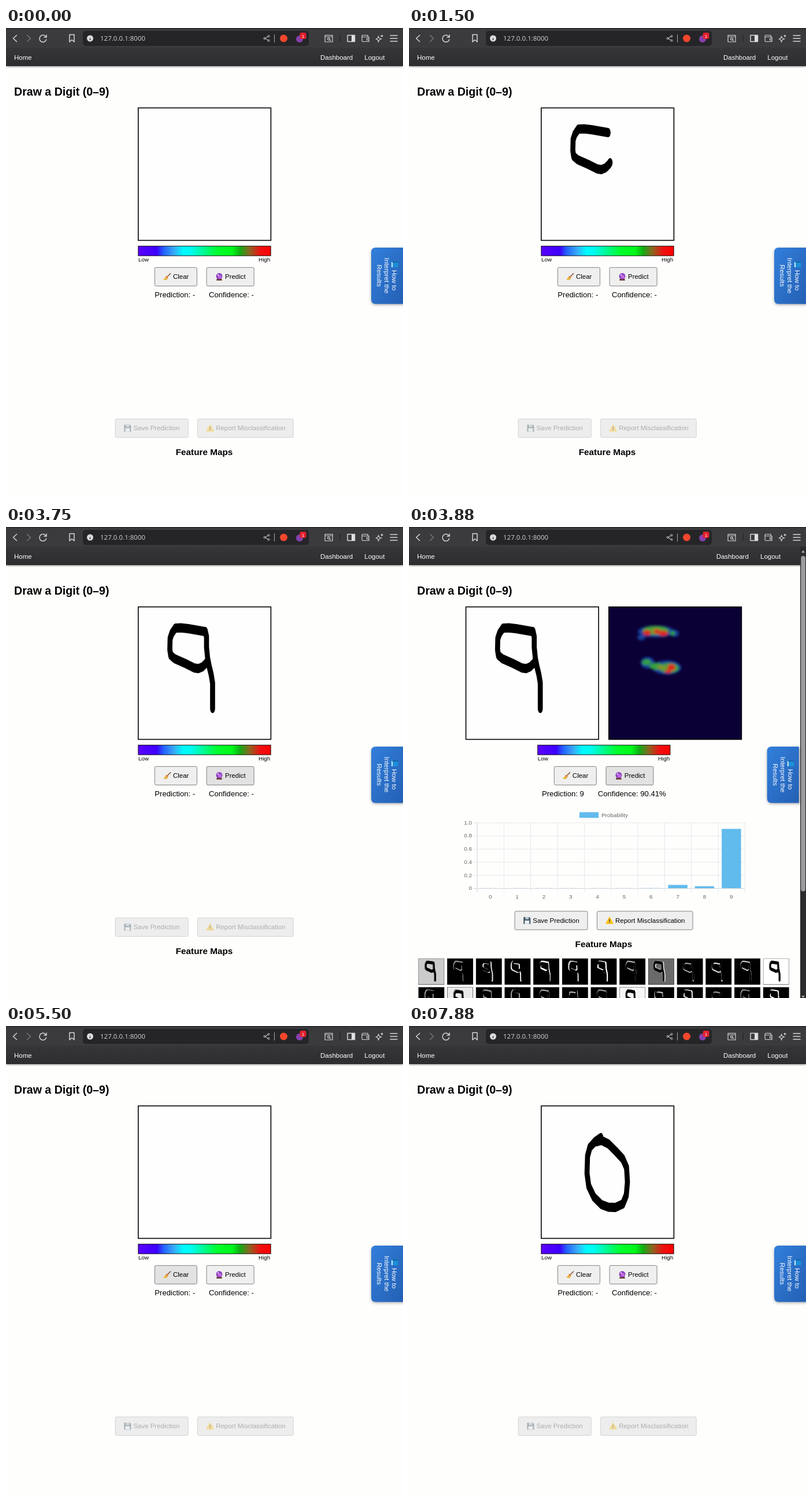
An HTML page that plays this animation: 687x815 px, repeating every 8000 ms.

```html
<!DOCTYPE html>
<html lang="en">
<head>
<meta charset="utf-8">
<title>Draw a Digit</title>
<style>
  html, body { margin: 0; width: 100%; height: 100%; overflow: hidden; background: #fefefd; }
  svg { display: block; width: 100vw; height: 100vh; }
  text { font-family: "Liberation Sans", Arial, sans-serif; font-size: 11.48px; }
  .icon { fill: none; stroke: #d6d6d8; stroke-width: 1.5; stroke-linecap: round; stroke-linejoin: round; }
  .pen { fill: none; stroke: currentColor; stroke-linecap: round; stroke-linejoin: round; }
</style>
</head>
<body>
<svg id="stage" viewBox="0 0 687 815"></svg>
<script>
const LOOP = 8000, TICK = 125;
const PEN_ASPECT = 0.54; // the pen tip is narrower than it is tall

const LOOP_OF_NINE = '344.5,181 316,176 303,174.5 293,175 287,184 284,193 283.5,212 285,222 292,228 310,236 326,244 333,245 340,242 346,236 348,233';
const LEG_OF_NINE = '345,181 347,190 347,208 349,228 352,243 355,255 357.5,270 357.5,314';
const ZERO = '332,193 322,200 313,210 309,225 308,255 311,277 320,296 333,309 345,313.5 357,314 370,308 376,293 378,270 376.5,245 370,230 358,217 345,204 333,198 321,201';

const rect = (x, y, w, h, fill, extra = '') =>
  `<rect x="${x}" y="${y}" width="${w}" height="${h}" fill="${fill}" ${extra}/>`;
const label = (x, y, str, fill = '#000', extra = '') =>
  `<text x="${x}" y="${y}" fill="${fill}" ${extra}>${str}</text>`;
const size = px => `style="font-size:${px}px"`;
const at = (x, y, content, extra = '') => `<g transform="translate(${x} ${y})" ${extra}>${content}</g>`;
const repeat = (n, fn) => Array.from({ length: n }, (_, i) => fn(i)).join('');

function stroke(points, progress = 1) {
  if (progress <= 0) return '';
  const wide = points.replace(/([\d.]+),/g, (_, x) => (x / PEN_ASPECT).toFixed(1) + ',');
  return `<polyline class="pen" points="${wide}" transform="scale(${PEN_ASPECT} 1)" pathLength="1"
    stroke-dasharray="${progress >= 1 ? 'none' : progress + ' 2'}"/>`;
}

// Small pictograms, centred on the origin
const emoji = {
  broom: `<path d="M6-6L0 0" stroke="#8a5a3c" stroke-width="1.5"/><path d="M-1-2L2 1L-1 6L-7 5Z" fill="#f2c14e"/>
    <path d="M-2-1L1 2" stroke="#d9534f" stroke-width="1.3"/><path d="M-5 4L-1 1M-2 5L0 2" stroke="#c08a2c" stroke-width=".7"/>`,
  ball: `<path d="M-4 3H4L5 6.5H-5Z" fill="#6b4038"/><circle cy="-1" r="5.4" fill="#8b3fc0"/>
    <circle cx="1" cy="0" r="3" fill="#c06be0"/><circle cx="-2" cy="-3" r="1.3" fill="#e9c8f7"/>`,
  disk: `<path d="M-6-6H4L6-4V6H-6Z" fill="#3f5561"/>` + rect(-3, -6, 6, 4, '#b8c8d0') + rect(-4, 0, 8, 6, '#e8eef1'),
  warning: `<path d="M0-5.5L6 5H-6Z" fill="#fcc21b" stroke="#fcc21b" stroke-width="1.5" stroke-linejoin="round"/>
    <path d="M0-2V1.4M0 3.3V3.5" stroke="#444" stroke-width="1.5" stroke-linecap="round"/>`,
  book: rect(-5, -6, 10, 12, '#1c8fd6', 'rx="1"') + rect(-4, 3.5, 9, 1.7, '#e8f3fa') + rect(-5, -6, 2, 10, '#1565a8')
};

const defs = `<defs>
  <linearGradient id="scale">
    <stop offset="0" stop-color="#5a00ff"/><stop offset=".14" stop-color="#3c00ff"/>
    <stop offset=".19" stop-color="#2460ff"/><stop offset=".27" stop-color="#38aaf8"/>
    <stop offset=".34" stop-color="#00fbff"/><stop offset=".4" stop-color="#00fcf0"/>
    <stop offset=".52" stop-color="#00fa78"/><stop offset=".6" stop-color="#00ff2c"/>
    <stop offset=".71" stop-color="#00f818"/><stop offset=".77" stop-color="#14aa14"/>
    <stop offset=".84" stop-color="#8c6420"/><stop offset=".92" stop-color="#ee1010"/>
    <stop offset="1" stop-color="#f00"/>
  </linearGradient>
  <linearGradient id="tab" x2="1" y2="1"><stop stop-color="#327fdb"/><stop offset="1" stop-color="#2460b4"/></linearGradient>
  <linearGradient id="nav" x2="0" y2="1"><stop stop-color="#363638"/><stop offset="1" stop-color="#2d2d2f"/></linearGradient>
  <filter id="shadow" x="-20%" y="-20%" width="140%" height="140%"><feGaussianBlur stdDeviation="2.5"/></filter>
  <filter id="glow" x="-50%" y="-50%" width="200%" height="200%"><feGaussianBlur stdDeviation="2.2"/></filter>
  <filter id="soft"><feGaussianBlur stdDeviation="2.5"/></filter>
  <clipPath id="thumb"><rect width="45" height="45.5"/></clipPath>
  <g id="nine">${stroke(LOOP_OF_NINE)}${stroke(LEG_OF_NINE)}</g>
</defs>`;

const icon = (x, d, extra = '') => at(x, 18, `<path class="icon" d="${d}" ${extra}/>`);
const browserBar = rect(0, 0, 687, 34, '#3b3b3e') + rect(0, 0, 687, 1.5, '#29292d')
  + rect(133, 5, 391, 26, '#252528', 'rx="5"')
  + icon(15.5, 'M3-5.5L-3 0L3 5.5')
  + icon(39.5, 'M-3-5.5L3 0L-3 5.5', 'style="stroke:#77777a"')
  + icon(64, 'M5.5-2A6 6 0 1 0 5.7 2M6-6V-2H2')
  + icon(114, 'M-4-6.5H4V6L0 2.5L-4 6Z')
  + at(145.5, 18, `<circle r="5.5" fill="#dcdcde"/><path d="M0-2.8V-2.6M0-.3V3" stroke="#252528" stroke-width="1.5"/>`)
  + label(163, 22, '127.0.0.1:8000', '#c9c9cb', `style="font:11.5px 'Noto Sans',sans-serif"`)
  + icon(451, 'M-3 0L3-3.5M-3 0L3 3.5', 'style="stroke-width:1"')
  + repeat(3, i => `<circle cx="${[447.5, 454.5, 454.5][i]}" cy="${[18, 14.2, 21.8][i]}" r="1.6" fill="none" stroke="#bbb"/>`)
  + rect(464, 11, 1, 14, '#aaa')
  + `<circle cx="480.5" cy="18" r="6.5" fill="#f4472c"/><circle cx="508" cy="19" r="6" fill="#8440ae"/>`
  + rect(508.5, 8, 11, 11, '#e3202e', 'rx="3"')
  + label(514, 16.5, '1', '#fff', 'text-anchor="middle" style="font-size:8px"')
  + icon(558.5, 'M-6.5-5.5H6.5V6H-6.5ZM-6.5-3H6.5M1.8 1A1.9 1.9 0 1 0-2 1A1.9 1.9 0 1 0 1.8 1M1.5 2.4L3 4', 'style="stroke-width:1.2"')
  + rect(577.5, 12, 1, 12, '#1f1f22')
  + icon(597, 'M-6-5.5H6.5V5.5H-6Z') + rect(598, 13, 5, 10, '#e0e0e2')
  + icon(622, 'M4-3V-5.5H-4Q-6-5.5-6-3.5V4Q-6 5.5-4.5 5.5H6V-2.5H-5M6 0H2.5V3H6', 'style="stroke-width:1.2"')
  + icon(646, 'M-1.5-4Q-1 .5 4 1Q-1 1.5-1.5 6.5Q-2 1.5-6 1Q-2 .5-1.5-4ZM4.5-6V-2.5M2.8-4.3H6.2', 'style="stroke-width:1.2"')
  + icon(671, 'M-6-5H6M-6 0H6M-6 5H6');

function button(x, y, w, name, textX, str, mode) {
  const fill = { idle: '#efefef', hover: '#e2e2e2', active: '#f3f3f3', disabled: '#ededed' }[mode];
  const off = mode === 'disabled';
  return rect(x, y, w, 32, fill, `rx="2" stroke="${off ? '#cfcfcf' : '#767676'}" stroke-width=".9"`)
    + at(textX - 10, y + 16, emoji[name], off ? 'opacity=".4"' : '')
    + label(textX, y + 20, str, off ? '#adadad' : '#000');
}

const turned = (x, y, str) => `<text transform="translate(${x} ${y}) rotate(90)" text-anchor="middle" fill="#fff">${str}</text>`;
const sideTab = '<path d="M690 382H640Q632 382 632 390V471Q632 479 640 479H690Z" fill="#0005" filter="url(#shadow)"/>'
  + '<path d="M687 380H640Q632 380 632 388V469.500Q632 477.500 640 477.500H687Z" fill="url(#tab)"/>'
  + at(672.5, 409, `<g transform="rotate(90)">${emoji.book}</g>`)
  + turned(668, 436.5, 'How to') + turned(655, 428.5, 'Interpret the') + turned(642, 428.5, 'Results');

function chart() {
  const left = 117.5, step = 46.35, top = 511.5, bottom = 625, grid = '#e3e6e8';
  const probability = [.001, .001, .001, .001, .001, .001, .002, .05, .03, .9041];
  const text = (x, y, str, anchor) => label(x, y, str, '#666', `text-anchor="${anchor}" ${size(9.84)}`);
  return rect(295, 493.5, 33, 9.8, '#61bbed') + text(333, 501.5, 'Probability', 'start')
    + repeat(6, i => {
      const y = top + i * (bottom - top) / 5;
      return rect(111, y, 470, .9, i === 5 ? '#ccd2d5' : grid)
        + text(109, y + 3.2, ['1.0', '0.8', '0.6', '0.4', '0.2', '0'][i], 'end');
    })
    + repeat(11, i => rect(left + i * step, top, .9, 120.5, i ? grid : '#ccd2d5'))
    + repeat(10, i => {
      const h = probability[i] * (bottom - top), x = left + (i + .5) * step;
      return rect(x - 16.7, bottom - h, 33.4, h, '#61bbed') + text(x, 643, i, 'middle');
    });
}

const blobs = (fill, list) => list.map(([x, y, rx, ry]) =>
  `<ellipse cx="${x}" cy="${y}" rx="${rx}" ry="${ry}" fill="${fill}"/>`).join('');
const heatmap = rect(345.8, 138.3, 229.6, 229.2, '#0b0036', 'stroke="#000" stroke-width="1.6"')
  + '<g filter="url(#glow)">'
  + blobs('#17409c', [[428, 181, 32, 10], [402, 191, 7, 5], [460, 184, 7, 6], [413, 235, 12, 10], [446, 243, 25, 12]])
  + blobs('#35a03c', [[427, 179, 23, 8], [456, 184, 4, 4], [411, 234, 8, 5], [428, 241, 12, 6], [450, 244, 17, 9]])
  + blobs('#82972c', [[428, 180, 9, 6], [437, 243, 8, 4]])
  + blobs('#da2b20', [[412, 183, 7, 5], [440, 184, 8, 5], [429, 181, 5, 4], [454, 243, 7, 6], [448, 250, 6, 3]])
  + '</g>';

// Each feature map: background, digit colour, and an offset that leaves only edges
const nineIn = (color, dx, dy, width) => `<use href="#nine" stroke-width="${width}" style="color:${color}"
  transform="translate(${-50.4 + dx} ${-31.7 + dy}) scale(.22)" filter="url(#soft)"/>`;
function featureMap([bg, color, dx, dy], x, y) {
  const cover = bg === '#000' ? '#000' : '#050505';
  return at(x, y, rect(0, 0, 45, 45.5, bg)
    + nineIn(color, 0, 0, 25) + nineIn(cover, dx, dy, 23)
    + rect(.3, .3, 44.4, 44.9, 'none', 'stroke="#222" stroke-width=".6"'), 'clip-path="url(#thumb)"');
}
const dark = (color, dx, dy) => ['#000', color, dx, dy];
const firstRow = [['#cbcbcb', '#555', 1, 0], dark('#999', 1, 2), dark('#eee', -1.8, -.8), dark('#eee', 1.8, -1),
  dark('#fff', -1, 2.2), dark('#ddd', 2, 1.5), dark('#fff', -2, .8), dark('#aaa', .2, 2.2), ['#6a6a6a', '#e8e8e8', -1.5, 0],
  dark('#aaa', 0, -1.8), dark('#ddd', .2, -2), dark('#ccc', 0, 2), ['#fff', '#333', .5, 0]];
const secondRow = [dark('#aaa', 1.5, 1), ['#eaeaea', '#666', 1, 1], dark('#999', -1, 2), dark('#999', 2, 0), dark('#aaa', 0, 2),
  dark('#bbb', -1, -2), dark('#999', 0, 2), ['#f6f6f6', '#333', 0, 0], dark('#bbb', 1, -2), dark('#ddd', -2, 1),
  dark('#999', 0, -2), dark('#aaa', 1, 1.5), dark('#fff', -1.5, 1.5)];
const row = (maps, y) => maps.map((map, i) => featureMap(map, 16.3 + i * 49.7, y)).join('');
const results = heatmap + chart() + row(firstRow, 746.5) + row(secondRow, 796.3);

const scrollbar = rect(677, 34, 10, 781, '#2b2b2d') + rect(678.3, 50, 7.6, 580.500, '#9c9c9e', 'rx="3.8"')
  + '<path d="M679 44.500H685L682 40ZM679 811H685L682 815Z" fill="#a5a5a7"/>';

function scene(tick) {
  const done = tick >= 31 && tick < 44;
  const shift = done ? -6.15 : 0, lift = done ? -11.500 : 0;
  const progress = (first, steps) => Math.min(1, (tick - first + 1) / steps);
  const drawing = tick < 44
    ? stroke(LOOP_OF_NINE, progress(5, 8)) + stroke(LEG_OF_NINE, progress(19, 4))
    : stroke(ZERO, progress(55, 7));
  const predictMode = tick === 29 ? 'active' : tick >= 25 && tick < 35 ? 'hover' : 'idle';
  const clearMode = tick === 43 ? 'active' : tick >= 39 && tick < 46 ? 'hover' : 'idle';
  const saveMode = done ? 'idle' : 'disabled';
  const small = size(9.84), body = size(13.12);

  return defs + rect(0, 0, 687, 815, '#fefefd')
    + rect(0, 60, 687, 7, '#0006', 'filter="url(#shadow)"') + rect(0, 34, 687, 32, 'url(#nav)') + browserBar
    + label(14, 54.5, 'Home', '#fff')
    + at(2 * shift, 0, label(544, 54.5, 'Dashboard', '#fff') + label(620.3, 54.5, 'Logout', '#fff'))
    + label(14, 116.5, 'Draw a Digit (0–9)', '#000', 'font-weight="bold" style="font-size:19.6px"')
    + (done ? results : '')
    + at(done ? -130.3 : 0, 0,
      rect(228.8, 138.3, 229.6, 229.2, '#fefefe', 'stroke="#000" stroke-width="1.6"') + `<g stroke-width="16">${drawing}</g>`)
    + at(shift, 0,
      rect(228.9, 377.3, 229.2, 16.8, 'url(#scale)', 'stroke="#000" stroke-width=".9"')
      + label(229, 403.5, 'Low', '#000', small) + label(457.3, 403.5, 'High', '#000', 'text-anchor="end" ' + small)
      + button(257.4, 414.4, 73, 'broom', 289, 'Clear', clearMode)
      + button(347.1, 414.4, 82, 'ball', 379, 'Predict', predictMode))
    + label(done ? 230 : 257.3, 466, `Prediction: ${done ? 9 : '-'}`, '#000', body)
    + label(done ? 326.7 : 351, 466, `Confidence: ${done ? '90.41%' : '-'}`, '#000', body)
    + at(shift, lift,
      button(189.2, 676.4, 126, 'disk', 220.4, 'Save Prediction', saveMode)
      + button(331.6, 676.4, 165.6, 'warning', 363.2, 'Report Misclassification', saveMode)
      + (tick < 44 ? label(343, 738.700, 'Feature Maps', '#000', 'text-anchor="middle" font-weight="bold" ' + size(15.3)) : ''))
    + at(done ? -10.0 + 2 * shift + 10 : 0, 0, sideTab)
    + (done ? scrollbar : '');
}

const stage = document.getElementById('stage');
const start = performance.now();
let shown = -1;
function frame() {
  const tick = Math.floor((performance.now() - start) % LOOP / TICK);
  if (tick !== shown) stage.innerHTML = scene(shown = tick);
  requestAnimationFrame(frame);
}
frame();
</script>
</body>
</html>
```
